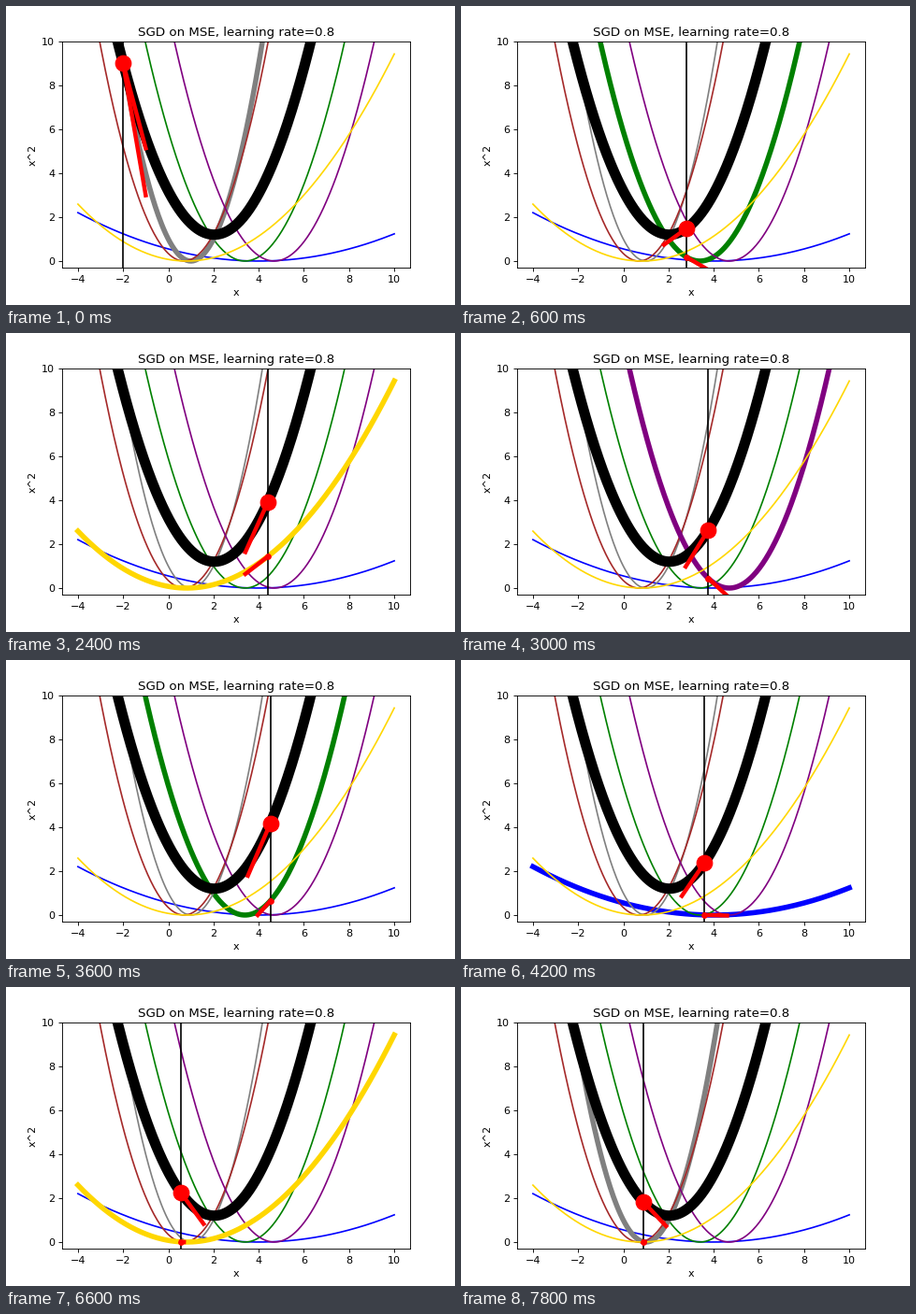
Write a matplotlib script that moves like this. It is 480x320 px and loops after 8000 ms.

```python
import numpy as np
import matplotlib.pyplot as plt
from matplotlib.animation import FuncAnimation

STEP_FRAMES = 3  # each descent step lasts 3 frames of 200 ms
FRAMES, INTERVAL = 40, 200

# colour: (curvature, minimum) of one sample's squared error
LOSSES = {
    "blue": (0.0345, 4.0),
    "green": (0.514, 3.39),
    "gray": (1.0, 1.0),
    "brown": (0.72, 0.69),
    "purple": (0.512, 4.69),
    "gold": (0.112, 0.815),
}
PICKS = ["gray", "green", "purple", "blue", "gold", "purple", "green",
         "blue", "brown", "gray", "brown", "gold", "brown", "gray"]
WEIGHTS = [-2, 2.8, 3.29, 4.44, 4.41, 3.76, 4.52,
           3.59, 3.61, 0.26, 1.44, 0.56, 0.61, 0.89]


def loss(name, x):
    curve, low = LOSSES[name]
    return curve * (x - low) ** 2


def slope(name, x):
    curve, low = LOSSES[name]
    return 2 * curve * (x - low)


def mean(fn, x):
    return sum(fn(name, x) for name in LOSSES) / len(LOSSES)


fig, ax = plt.subplots(figsize=(6, 4), dpi=80)
fig.subplots_adjust(left=0.125, right=0.9, bottom=0.125, top=0.88)
ax.set(xlim=(-4.7, 10.7), ylim=(-0.3, 10), xlabel="x", ylabel="x^2",
       title="SGD on MSE, learning rate=0.8")

xs = np.linspace(-4, 10, 300)
curves = {name: ax.plot(xs, loss(name, xs), color=name, lw=1.5)[0]
          for name in LOSSES}
ax.plot(xs, mean(loss, xs), color="black", lw=10)
cursor = ax.axvline(0, color="black", lw=1.5)
sample_tangent, = ax.plot([], [], color="red", lw=4)
mean_tangent, = ax.plot([], [], color="red", lw=4)
sample_dot, = ax.plot([], [], "o", color="red", ms=5)
mean_dot, = ax.plot([], [], "o", color="red", ms=15)


def draw_tangent(line, x, y, grad, length=1):
    dx = -np.sign(grad) * length
    line.set_data([x, x + dx], [y, y + grad * dx])


def update(frame):
    step = frame // STEP_FRAMES
    x, pick = WEIGHTS[step], PICKS[step]
    for name, line in curves.items():
        line.set_linewidth(5 if name == pick else 1.5)
    cursor.set_xdata([x, x])

    y, grad = loss(pick, x), slope(pick, x)
    mean_y, mean_grad = mean(loss, x), mean(slope, x)
    # where both slopes agree, the sample tangent stops at zero
    length = min(1, y / abs(grad)) if grad * mean_grad > 0 else 1
    draw_tangent(sample_tangent, x, y, grad, length)
    draw_tangent(mean_tangent, x, mean_y, mean_grad)
    sample_dot.set_data([x], [y])
    mean_dot.set_data([x], [mean_y])


anim = FuncAnimation(fig, update, frames=FRAMES, interval=INTERVAL,
                     repeat=True, repeat_delay=0, blit=False)
plt.show()
```
